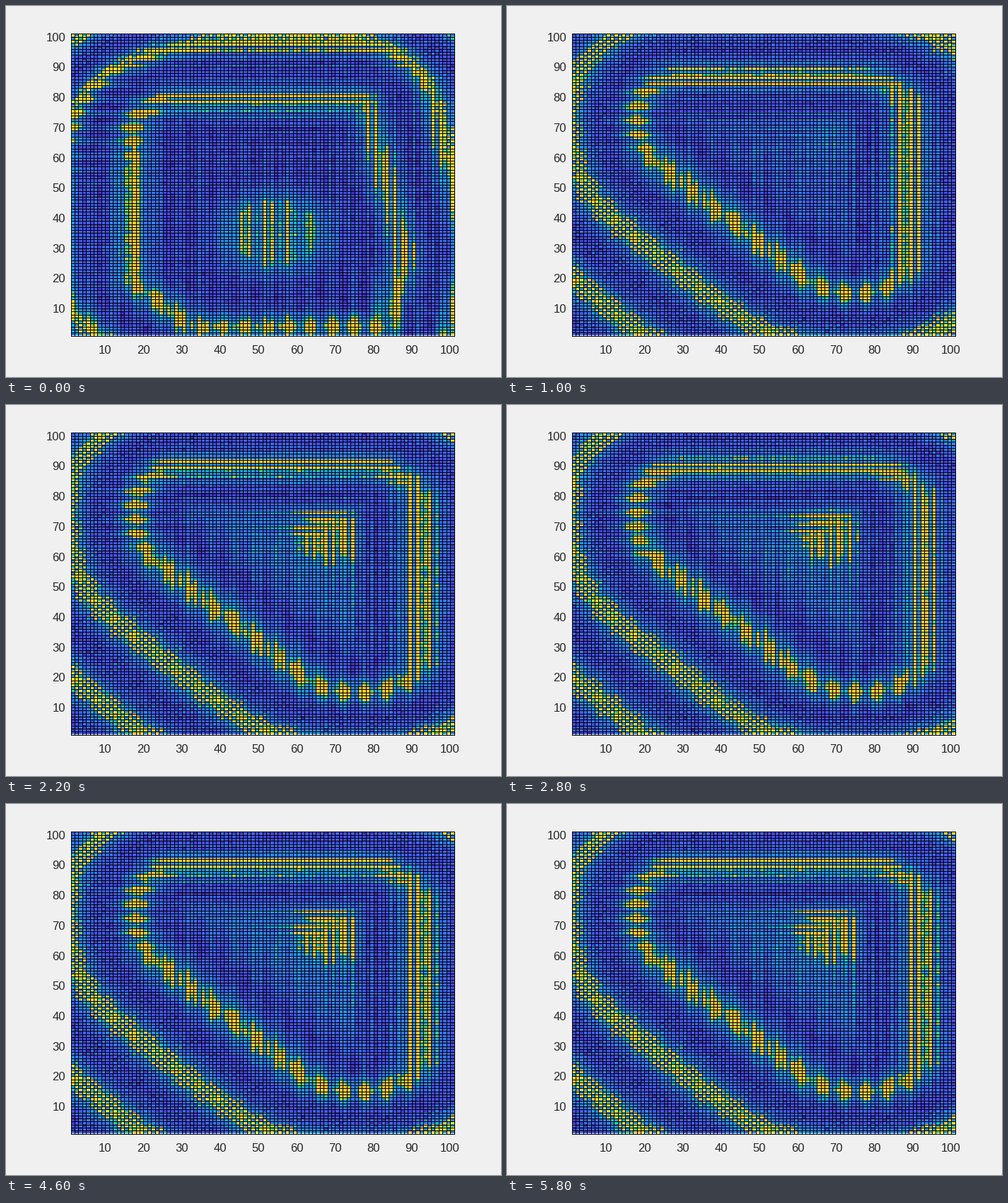
Write a matplotlib script that moves like this. It is 700 px wide and 525 px high and loops after 6000 ms.

```python
import matplotlib.pyplot as plt
import numpy as np
from matplotlib.animation import FuncAnimation
from matplotlib.collections import LineCollection
from matplotlib.colors import LinearSegmentedColormap

W, H, DPI = 700, 525, 100
LEFT, RIGHT, TOP, BOTTOM = 91.5, 633.5, 39.5, 466.5
FRAMES, STEP, PERIOD = 30, 200, 3
N = 100

PARULA = LinearSegmentedColormap.from_list("parula", [
    (0.242, 0.150, 0.660), (0.281, 0.323, 0.958), (0.179, 0.529, 0.968),
    (0.069, 0.695, 0.839), (0.216, 0.784, 0.592), (0.672, 0.779, 0.223),
    (0.997, 0.766, 0.220), (0.977, 0.984, 0.081)])

rng = np.random.default_rng(4)
noise = rng.normal(0, 1, (N, N))
X, Y = np.meshgrid(np.arange(1, N + 1) + 0.5, np.arange(1, N + 1) + 0.5)


def wave(z, period, phase=0.0):
    return np.cos(2 * np.pi * z / period + phase)


def ramp(k, k0, k1):
    return float(np.clip((k - k0) / (k1 - k0), 0, 1))


def merge(sides, diag):
    """Outward distance: rounded corners between sides, a firm diagonal."""
    sq = sum(np.maximum(s, 0) ** 2 for s in sides)
    return (sq ** 3 + np.maximum(diag, 0) ** 6) ** (1 / 6)


def planes(k):
    late = 3 * (1 - ramp(k, 5, 9))
    top = (Y - 77 + late) / 6.4
    right = (X - 77 + late) / 7.5
    bottom = (27 - Y) / 6
    left = (30 - X) / 6
    diag = (102 - X - Y) / 10.2
    return top, right, bottom, left, diag


def settled(k):
    """Arrival time of the front once the triangular source has formed."""
    a, b, c, e, d = planes(k)
    inner = -np.max([3 * a, 3 * b, c, e, d], axis=0)
    core = np.exp(-((X - 68) ** 2 + (Y - 67) ** 2) / 64)
    depth = 0.3 * np.clip(inner, 0, 1) + 0.9 * core
    return 3 + merge((a, b, c, e), d) - ramp(k, 3, 9) * depth


def opening():
    """Arrival time for the first ring and its oval core."""
    sides = ((Y - 79) / 6.6, (X - 88 + 0.2 * abs(Y - 28)) / 6,
             (4 - Y) / 6, (17 - X) / 6.5, (Y - X - 55) / 9)
    diag = (36 - X - Y) / 9
    edge = np.max(sides + (diag,), axis=0)
    oval = np.hypot((X - 54) / 14, (Y - 35) / 13)
    core = 0.34 + 1.3 * np.maximum(oval - 0.75, 0)
    inside = np.minimum(np.maximum(3 + edge, 1.5), core)
    return np.where(edge > 0, 3 + merge(sides, diag),
                    np.where(oval < 1.6, inside, np.maximum(3 + edge, 1.5)))


def texture(k, dist):
    """Rows above, columns at the right, blocks and checks elsewhere."""
    flip = np.pi * ((k // PERIOD + 1) % 2)
    parts = planes(k)
    wts = np.exp(2.5 * (np.array(parts) - np.max(parts, axis=0)))
    wts /= wts.sum(axis=0)
    rows = wave(Y - 77, 2.45, flip)
    cols = wave(X - 77, 2.45, flip)
    blocks = wave(X - 72, 5.7, flip)
    check = np.cos(np.pi * (np.floor(X) + np.floor(Y)) + flip)
    check = check * (0.65 + 0.35 * wave(X - Y, 11))
    pillars = 0.5 * wave(X, 2.1, flip) + 0.5 * blocks
    far = np.clip((dist - 2.6) / 1.6, 0, 1)
    diag = pillars * (1 - far) + check * far
    kinds = (rows, cols, blocks, wave(Y - 77, 4.7, flip), diag)
    tex = sum(w * s for w, s in zip(wts, kinds))
    corner = np.clip((dist - 2.6) / 1.2, 0, 1)
    return tex * (1 - corner) + check * corner


def field(k):
    mix = ramp(k, 0, 4)
    arrive = (1 - mix) * opening() + mix * settled(k)
    gap = (k - arrive + PERIOD / 2) % PERIOD - PERIOD / 2
    dist = np.maximum(arrive - 3, 0)
    tex = texture(k, dist)
    grain = noise if (k // PERIOD) % 2 else noise[::-1]
    crest = np.exp(-(gap / 0.55) ** 2)
    glow = np.exp(-(gap / 0.75) ** 2)
    base = (0.17 + 0.075 * tex + 0.03 * grain + 0.18 * glow
            + 0.04 * wave(gap, PERIOD))
    hot = 1 / (1 + np.exp(-(crest + 0.45 * tex + 0.06 * grain - 0.82) / 0.06))
    peak = 0.87 + 0.06 * np.clip(dist - 2, 0, 1)
    return np.clip(base * (1 - hot) + peak * hot, 0, 1)


fig = plt.figure(figsize=(W / DPI, H / DPI), dpi=DPI, facecolor="#f0f0f0")
ax = fig.add_axes([LEFT / W, 1 - BOTTOM / H,
                   (RIGHT - LEFT) / W, (BOTTOM - TOP) / H])
ax.axis("off")
img = ax.imshow(field(0), cmap=PARULA, vmin=0, vmax=1, origin="lower",
                extent=(1, N + 1, 1, N + 1), aspect="auto",
                interpolation="nearest")

edges = range(1, N + 2)
lines = [[(v, 1), (v, N + 1)] for v in edges]
lines += [[(1, v), (N + 1, v)] for v in edges]
ax.add_collection(LineCollection(lines, colors="black", linewidths=72 / DPI,
                                 antialiaseds=False, clip_on=False))


def label(px, py, text, align):
    fig.text(px / W, 1 - py / H, text, ha=align, va="baseline", fontsize=12,
             family="Liberation Sans", color="#262626")


for v in range(10, 101, 10):
    label(LEFT + (v - 1) * (RIGHT - LEFT) / N, 491.5, str(v), "center")
    label(84, BOTTOM + 6 - (v - 1) * (BOTTOM - TOP) / N, str(v), "right")


def draw(k):
    img.set_data(field(k))
    return [img]


anim = FuncAnimation(fig, draw, frames=FRAMES, interval=STEP,
                     init_func=lambda: draw(0), repeat=True, repeat_delay=0)
plt.show()
```
